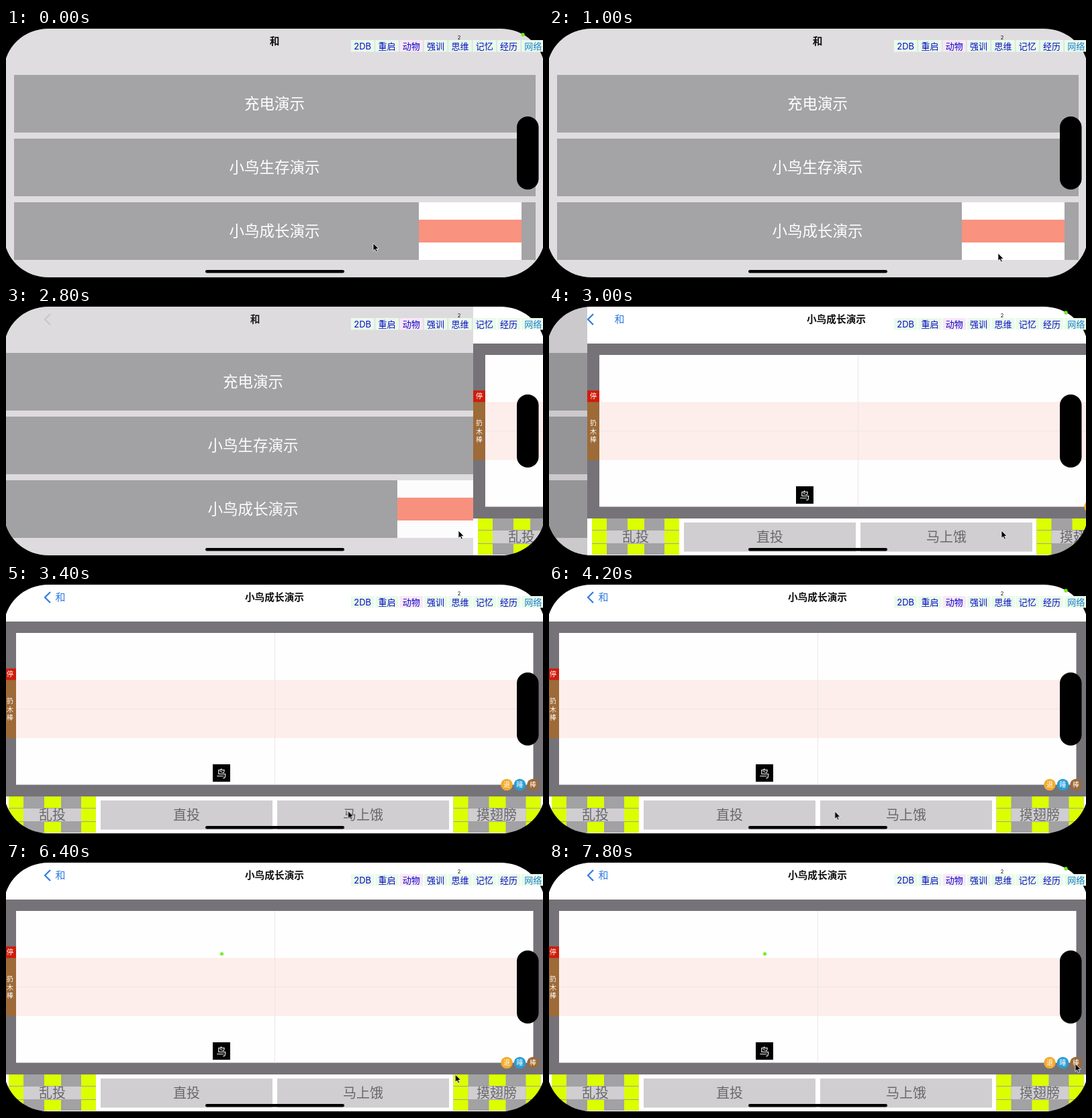
Write an HTML page that moves like this. It is 800 by 373 pixels and loops after 8000 ms.

```html
<!DOCTYPE html>
<html lang="zh">
<head>
<meta charset="utf-8">
<title>小鸟成长演示</title>
<style>
html, body { margin: 0; width: 100%; height: 100%; overflow: hidden; background: #000; }
svg { display: block; width: 100vw; height: 100vh; }
text { font-family: "Noto Sans CJK SC", "Noto Sans CJK", sans-serif; text-anchor: middle; }
.anim { animation: 8s step-end -20ms infinite; }
.row { fill: #a4a3a5; }
.row-label { font-size: 22.5px; font-weight: 300; fill: #fff; }
.title { font-size: 14.7px; font-weight: 700; fill: #111; }
.button { fill: #d0ced1; }
.button-label { font-size: 20px; fill: #68676a; }
.small { font-size: 10px; fill: #fff; }
.chip { font-size: 13px; fill: #0808c4; }
.latin { font-family: Inter, sans-serif; }

#list { animation-name: list; }
#list-title { animation-name: list-title; }
#detail { animation-name: detail; }
#detail-title { animation-name: detail-title; }
#back { animation-name: back; }
#chevron { animation-name: chevron; }
#food { animation-name: food; }
#cursor { animation-name: cursor, cursor-fade; }

@keyframes list {
  0% { transform: none; filter: none; }
  35% { transform: translateX(-32px); filter: brightness(.99); }
  37.5% { transform: translateX(-223px); filter: brightness(.91); }
  40%, 100% { transform: translateX(-241px); filter: brightness(.9); }
}
@keyframes list-title {
  0% { transform: none; opacity: 1; }
  35% { transform: translateX(-29px); opacity: .92; }
  37.5%, 100% { transform: translateX(-29px); opacity: 0; }
}
@keyframes detail {
  0% { transform: translateX(810px); }
  35% { transform: translateX(699px); }
  37.5% { transform: translateX(60px); }
  40%, 100% { transform: none; }
}
@keyframes detail-title {
  0% { transform: translateX(28px); opacity: 0; }
  37.5% { transform: translateX(28px); opacity: 1; }
  40%, 100% { transform: none; opacity: 1; }
}
@keyframes back {
  0% { transform: translateX(24px); opacity: 0; }
  37.5% { transform: translateX(24px); opacity: 1; }
  40%, 100% { transform: none; opacity: 1; }
}
@keyframes chevron {
  0% { opacity: 0; stroke: #888; }
  35% { opacity: .25; stroke: #888; }
  37.5%, 100% { opacity: 1; stroke: #2f7ce0; }
}
@keyframes food {
  0% { transform: translate(312.5px, 220.5px); opacity: 0; }
  65% { transform: translate(312.5px, 220.5px); opacity: 1; }
  67.5%, 100% { transform: translate(321.5px, 137px); opacity: 1; }
}
@keyframes cursor {
  0% { transform: translate(547px, 321px); animation-timing-function: steps(5); }
  12.5% { transform: translate(669px, 336px); animation-timing-function: steps(7); }
  30% { transform: translate(674px, 335px); }
  37.5% { transform: translate(674px, 335px); animation-timing-function: steps(2); }
  42.5% { transform: translate(509.5px, 338.5px); }
  47.5% { transform: translate(509.5px, 338.5px); animation-timing-function: steps(5); }
  60% { transform: translate(300px, 340px); }
  70% { transform: translate(400px, 340px); animation-timing-function: steps(2); }
  75% { transform: translate(612px, 325px); animation-timing-function: steps(6); }
  90%, 100% { transform: translate(784px, 301px); }
}
@keyframes cursor-fade {
  0% { opacity: 1; }
  62.5% { opacity: 0; }
  70%, 100% { opacity: 1; }
}
</style>
</head>
<body>
<svg viewBox="0 0 800 373">
  <defs>
    <g id="checker">
      <path fill="#a2a1a3" d="M0 317h130v54H0z"/>
      <path fill="#dcff00" d="M0 317h22v54H0zM53 317h25v54H53zM108 317h22v54H108z"/>
      <path stroke="#a2a1a3" d="M0 334.5h130M0 354.5h130"/>
      <path fill="#d0ced1" d="M22 335h86v19H22z"/>
    </g>
    <clipPath id="screen"><rect x="-3" y="1" width="806" height="371" rx="66" ry="63"/></clipPath>
  </defs>

  <rect width="800" height="373"/>
  <g clip-path="url(#screen)">
    <g id="list" class="anim">
      <rect x="-3" width="1060" height="373" fill="#dfdde0"/>
      <path class="row" d="M12 70h777v86H12zM12 165h777v86H12zM12 260h777v86H12z"/>
      <path fill="#fff" d="M615 260h153v86H615z"/>
      <path fill="#f9927f" d="M615 286h153v34H615z"/>
      <g class="row-label">
        <text x="400" y="121.3">充电演示</text>
        <text x="400" y="216.3">小鸟生存演示</text>
        <text x="400" y="311.3">小鸟成长演示</text>
      </g>
    </g>

    <g id="detail" class="anim">
      <rect x="-3" width="806" height="373" fill="#fff"/>
      <rect x="-3" y="56" width="806" height="261" fill="#757377"/>
      <rect x="15" y="73" width="770.5" height="226.5" fill="#fffeff"/>
      <rect x="15" y="143" width="770.5" height="87" fill="#fdeeec"/>
      <path stroke="#ebe5e9" d="M15 186.5H785.5M400.5 73V299.5"/>
      <rect x="-3" y="126" width="18" height="17.5" fill="#d01c0b"/>
      <rect x="-3" y="143.5" width="18" height="86.5" fill="#9d6a38"/>
      <g class="small">
        <text x="6" y="138.3">停</text>
        <text x="6" y="178">扔</text>
        <text x="6" y="190.5">木</text>
        <text x="6" y="203">棒</text>
      </g>
      <rect x="308" y="269" width="26" height="26"/>
      <text x="321" y="287.5" font-size="15" fill="#fff">鸟</text>
      <circle cx="746" cy="299.5" r="8.8" fill="#f3ab2e"/>
      <circle cx="765.5" cy="299.5" r="8.8" fill="#2b9dd3"/>
      <circle cx="785" cy="299.5" r="8.8" fill="#9d6a38"/>
      <g class="small">
        <text x="746" y="303.2">退</text>
        <text x="765.5" y="303.2">睡</text>
        <text x="785" y="303.2">棒</text>
      </g>
      <use href="#checker" x="4"/>
      <use href="#checker" x="666.5"/>
      <path class="button" d="M141 323h256v43.5H141zM404 323h256v43.5H404z"/>
      <g class="button-label">
        <text x="69" y="352.4">乱投</text>
        <text x="269" y="352.4">直投</text>
        <text x="532" y="352.4">马上饿</text>
        <text x="731" y="352.4">摸翅膀</text>
      </g>
    </g>

    <text id="list-title" class="title anim" x="400" y="25.3">和</text>
    <text id="detail-title" class="title anim" x="400" y="25.3">小鸟成长演示</text>
    <text id="back" class="anim" x="81" y="25.3" font-size="15" fill="#2f7ce0">和</text>
    <path id="chevron" class="anim" d="M66 12l-8 8 8 8" fill="none" stroke-width="2.2"/>
    <circle id="food" class="anim" r="2.6" fill="#6ff01c"/>
  </g>

  <g id="chips"></g>
  <text class="latin" x="675" y="17" font-size="7.5">2</text>
  <circle id="lamp" cx="770" cy="10" r="2.7" fill="#6ff01c"/>
  <rect x="761" y="132" width="32.5" height="109" rx="16.2"/>
  <rect x="297" y="361" width="207" height="4.6" rx="2.3"/>
  <path id="cursor" class="anim" d="M0 0v11.5l2.6-2.4 1.8 4 2-.9-1.8-3.8h3.6z" stroke="#fff" stroke-width=".8"/>
</svg>
<script>
const chips = ['2DB', '重启', '动物', '强训', '思维', '记忆', '经历', '网络'];
document.getElementById('chips').innerHTML = chips.map((label, i) => {
  const center = 531.2 + i * 36.3;
  const fill = label === '动物' ? '#fce7f6' : '#e9fbea';
  const color = label === '网络' ? ' style="fill:#1d7fce"' : '';
  return `<rect x="${center - 17.3}" y="18" width="34.8" height="17.5" fill="${fill}"/>
    <text class="chip${i ? '' : ' latin'}" x="${center}" y="31.6"${color}>${label}</text>`;
}).join('');

// The lamp lights on every third 200 ms tick.
const ticks = 40;
const blink = Array.from({ length: ticks }, (_, i) => ({
  offset: i / ticks, opacity: i % 3 ? 0 : 1, easing: 'steps(1)'
}));
blink.push({ offset: 1, opacity: 1 });
document.getElementById('lamp').animate(blink, { duration: 8000, delay: -20, iterations: Infinity });
</script>
</body>
</html>
```
